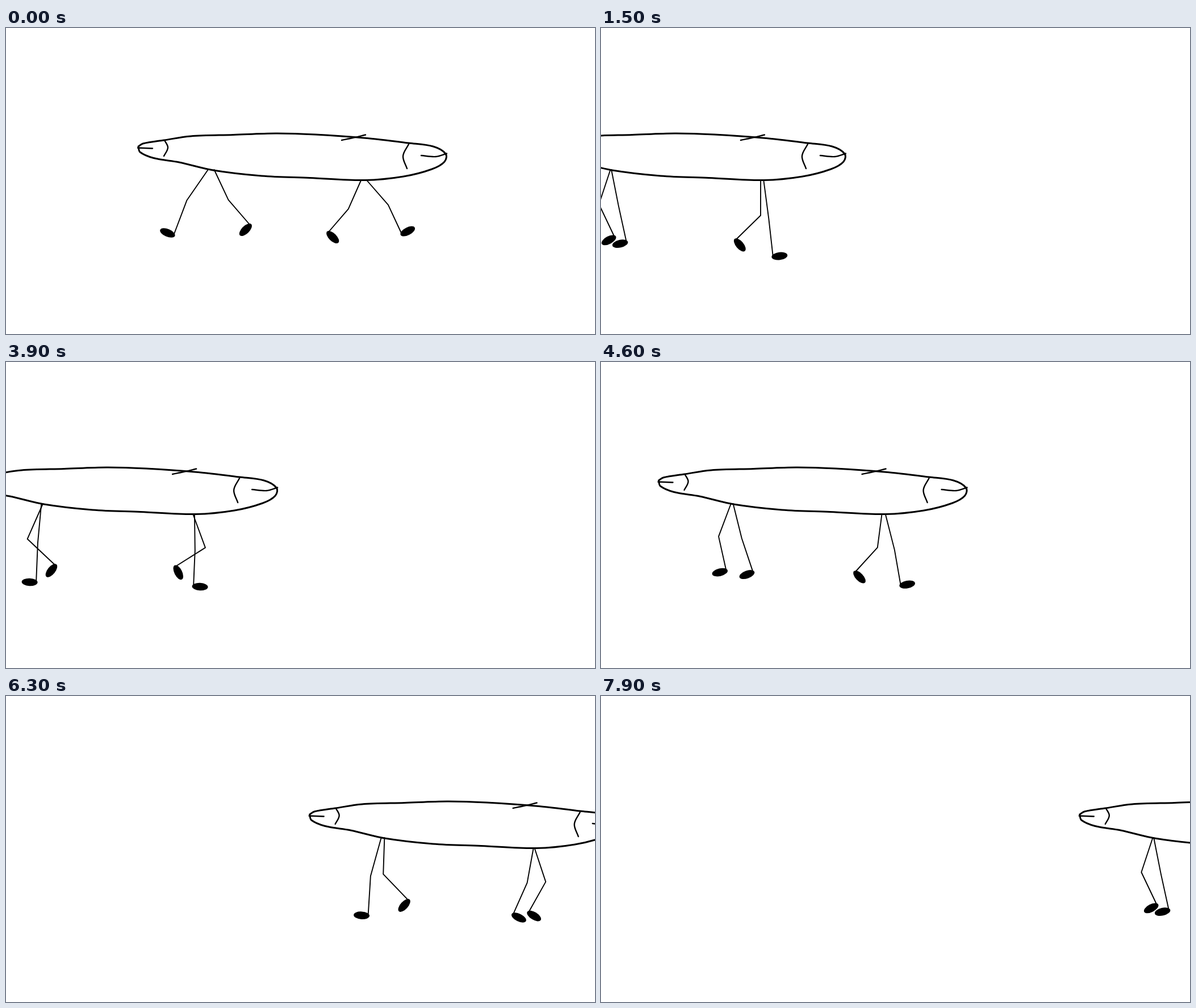
An HTML page with a canvas for the animation above (8 s loop, 1037 by 540 pixels).

```html
<!DOCTYPE html>
<html lang="en">
<head>
<meta charset="utf-8">
<title>Two-headed walker</title>
<style>
html, body { margin: 0; width: 100%; height: 100%; overflow: hidden; background: #fff; }
canvas { display: block; }
</style>
</head>
<body>
<canvas id="stage" width="1037" height="540"></canvas>
<script>
const ctx = document.getElementById('stage').getContext('2d');
const LOOP = 8000, TICK = 100, STEP = 3200 / 3;
const { PI, sin, cos, atan2, hypot } = Math;

// Walk left, turn, walk right, turn: [ms, px]
const travel = [[0, 0], [1000, -226], [2600, -607], [5300, 35], [7670, 667], [8000, 585]];

const outline = [
  [233, 209], [241, 204], [278, 198], [325, 191], [400, 188.5], [475, 186], [545, 188],
  [630, 194], [709, 203], [752, 209], [774, 222], [772, 236], [750, 249], [700, 262],
  [632, 268.5], [535, 264.5], [450, 261], [365, 251], [305, 237], [260, 229.5], [236, 219], [233, 209]
];
const marks = [
  [[591, 198], [610, 194], [633, 188.5]],
  [[709, 205], [699, 226], [706, 248]],
  [[731, 225], [757, 227], [776, 221.5]],
  [[279, 198], [285, 211], [278, 226]],
  [[232, 211.5], [258, 212.5]]
];

// Ankle paths over two steps: five points on the ground side, five swinging
const beats = [0, 0.406, 0.656, 0.906, 0.969];
const ends = [
  { hip: [361, 250], face: -1, path: [
    [430, 348], [390, 378], [351, 389], [336, 388], [305, 373],
    [295, 366], [369, 369], [385, 359], [407, 361], [443, 345]] },
  { hip: [630, 269], face: 1, path: [
    [697, 364], [648, 404], [628, 396], [591, 386], [574, 362],
    [567, 361], [582, 374], [596, 361], [618, 382], [677, 376]] }
];

const mix = (a, b, k) => a + (b - a) * k;

function offsetAt(t) {
  const i = travel.findIndex(p => p[0] > t);
  const [t0, x0] = travel[i - 1], [t1, x1] = travel[i];
  return mix(x0, x1, (t - t0) / (t1 - t0));
}

function ankleAt(path, q, swing) {
  const i = beats.findLastIndex(b => b <= q);
  const k = (q - beats[i]) / ((beats[i + 1] || 1) - beats[i]);
  const n = i + swing * beats.length;
  const a = path[n], b = path[(n + 1) % path.length];
  return [mix(a[0], b[0], k), mix(a[1], b[1], k)];
}

// Smooth stroke through the points
function curve(points, width) {
  const n = points.length;
  ctx.lineWidth = width;
  ctx.beginPath();
  ctx.moveTo(...points[0]);
  for (let i = 0; i < n - 1; i++) {
    const a = points[Math.max(i - 1, 0)], b = points[i];
    const c = points[i + 1], d = points[Math.min(i + 2, n - 1)];
    // Handles scale with the segment, so uneven spacing stays smooth
    const len = hypot(c[0] - b[0], c[1] - b[1]) / 3;
    const from = atan2(c[1] - a[1], c[0] - a[0]), to = atan2(d[1] - b[1], d[0] - b[0]);
    ctx.bezierCurveTo(
      b[0] + len * cos(from), b[1] + len * sin(from),
      c[0] - len * cos(to), c[1] - len * sin(to), c[0], c[1]);
  }
  ctx.stroke();
}

function leg({ hip, face, path }, q, swing) {
  const [ax, ay] = ankleAt(path, q, swing);
  const hx = mix(hip[0], ax, 0.08), hy = hip[1];
  const dx = ax - hx, dy = ay - hy, len = hypot(dx, dy);
  // The knee folds forward, most of all in mid-swing
  const bend = face * (swing ? 8 + 32 * sin(PI * q * q) : 8 * cos(PI * q) ** 2);
  const kx = hx + dx / 2 + bend * dy / len;
  const ky = hy + dy / 2 - bend * dx / len;
  ctx.lineWidth = 1.9;
  ctx.beginPath();
  ctx.moveTo(hx, hy);
  ctx.lineTo(kx, ky);
  ctx.lineTo(ax, ay);
  ctx.stroke();
  // The shoe stays square to the shin
  const tilt = -1.1 * atan2(face * (ax - kx), ay - ky);
  ctx.beginPath();
  ctx.ellipse(ax + face * 11.5 * cos(tilt), ay + 11.5 * sin(tilt), 14, 6.8, face * tilt, 0, 2 * PI);
  ctx.fill();
}

function draw(t) {
  const q = (t % STEP) / STEP;
  ctx.fillStyle = '#fff';
  ctx.fillRect(0, 0, 1037, 540);
  ctx.save();
  ctx.translate(offsetAt(t), 0);
  ctx.fillStyle = ctx.strokeStyle = '#000';
  ctx.lineCap = ctx.lineJoin = 'round';
  for (const end of ends) {
    leg(end, q, 0);
    leg(end, q, 1);
  }
  curve(outline, 3);
  for (const mark of marks) curve(mark, 2.4);
  ctx.restore();
}

const start = performance.now();
function frame() {
  const t = (performance.now() - start) % LOOP;
  draw(Math.floor(t / TICK) * TICK);
  requestAnimationFrame(frame);
}
frame();
</script>
</body>
</html>
```
